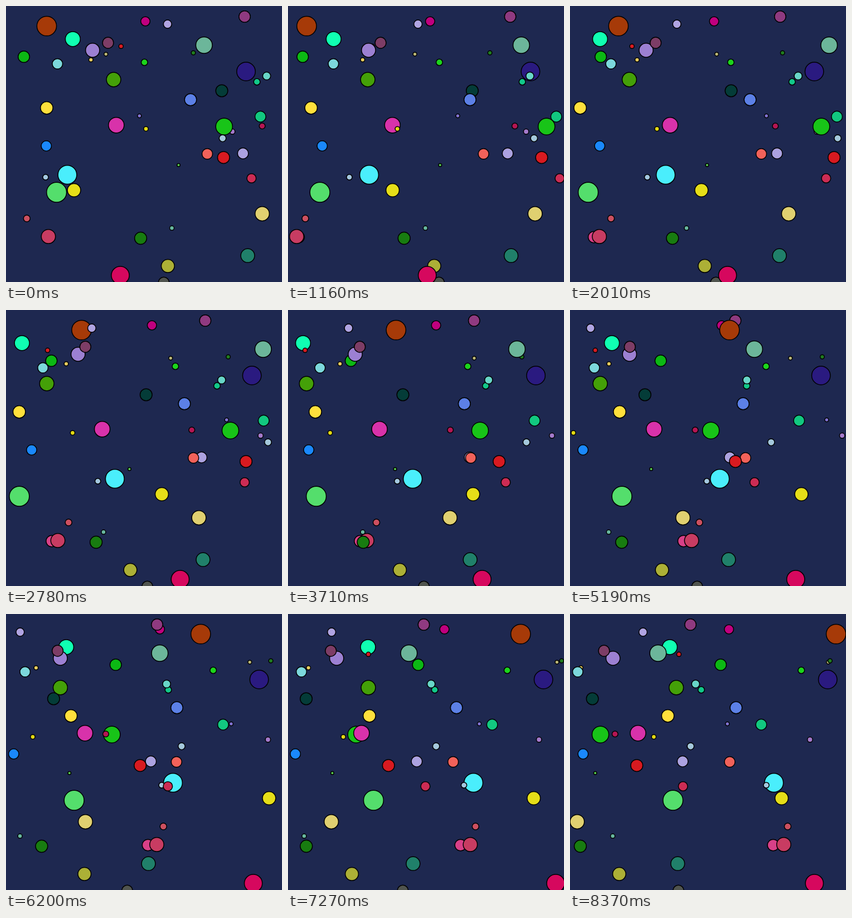
Write an HTML page that moves like this. It is 495 px wide and 495 px high and loops after 8.45 s.

```html
<!DOCTYPE html>
<html lang="en">
<head>
<meta charset="utf-8">
<title>Bouncing balls</title>
<style>
  html, body { margin: 0; width: 100%; height: 100%; overflow: hidden; background: #1e2850; }
  svg { display: block; width: 495px; height: 495px; }
  circle { stroke: #000; stroke-width: 1.5px; }
</style>
</head>
<body>
<svg viewBox="0 0 495 495">
  <!-- data-v: horizontal pixels per step -->
  <circle cx="250" cy="27.5" r="8.3" fill="#c0007f" data-v=".325"/>
  <circle cx="428" cy="19" r="10.2" fill="#8f3a80" data-v="-1.963"/>
  <circle cx="73" cy="36" r="17.6" fill="#a63a08" data-v="-4.858"/>
  <circle cx="289.7" cy="32.5" r="7.4" fill="#b0a4e2" data-v="-3.773"/>

  <circle cx="119.8" cy="59.3" r="13.4" fill="#10ffb2" data-v="-2.533"/>
  <circle cx="206.3" cy="72.3" r="4" fill="#d81c22" data-v="-3.66"/>
  <circle cx="32" cy="91" r="10.3" fill="#0cb814" data-v="-2.622"/>
  <circle cx="155.3" cy="79.3" r="12.6" fill="#9c80d2" data-v="-.724"/>
  <circle cx="183" cy="66" r="9.9" fill="#7d3d66" data-v="-1.13"/>

  <circle cx="152.3" cy="96.5" r="3.8" fill="#e6cc60" data-v="-1.23"/>
  <circle cx="92.3" cy="103.7" r="9.3" fill="#7cd8dc" data-v="-.726"/>
  <circle cx="179.2" cy="86.3" r="3.4" fill="#bcb878" data-v="3.225"/>
  <circle cx="336" cy="84" r="3.8" fill="#207c20" data-v="1.737"/>
  <circle cx="355.2" cy="70.3" r="14.8" fill="#6cb69a" data-v="4.212"/>
  <circle cx="248.3" cy="101" r="5.8" fill="#1cd41c" data-v="1.542"/>

  <circle cx="430.5" cy="117.5" r="16.7" fill="#2a1a80" data-v=".294"/>
  <circle cx="450" cy="136" r="5.8" fill="#12c88a" data-v="-1.987"/>
  <circle cx="467.5" cy="125.5" r="7.1" fill="#68d6c8" data-v="-2.243"/>

  <circle cx="193" cy="132" r="12.9" fill="#44a008" data-v="-3.328"/>
  <circle cx="387" cy="152" r="10.8" fill="#043c38" data-v="-3.77"/>
  <circle cx="331" cy="168" r="10.8" fill="#5c80e6" data-v="-.307"/>

  <circle cx="239.3" cy="197" r="3.5" fill="#8274d4" data-v="4.343"/>
  <circle cx="456.3" cy="198.4" r="9.8" fill="#12c880" data-v="1.655"/>
  <circle cx="406" cy="225.3" r="4.7" fill="#a47acc" data-v="1.405"/>
  <circle cx="391.2" cy="216.2" r="15" fill="#18c418" data-v="4.832"/>
  <circle cx="388.5" cy="237.2" r="6.2" fill="#a4c8dc" data-v="3.522"/>
  <circle cx="459.5" cy="215.3" r="5.3" fill="#b41654" data-v="-3.507"/>

  <circle cx="197.8" cy="213.7" r="14" fill="#d832aa" data-v="-.702"/>
  <circle cx="251" cy="220.3" r="4.1" fill="#e4da14" data-v="-3.655"/>
  <circle cx="425" cy="264.4" r="9.8" fill="#aca2e0" data-v="-2.065"/>
  <circle cx="361" cy="265.3" r="9.5" fill="#f2625a" data-v="-.69"/>
  <circle cx="390.2" cy="271.7" r="10.8" fill="#d81a20" data-v="4.315"/>

  <circle cx="72.3" cy="251" r="9.2" fill="#1a88fc" data-v="-.731"/>
  <circle cx="73" cy="182.7" r="11.2" fill="#ffe03c" data-v="-2.108"/>
  <circle cx="309.5" cy="285.3" r="2.8" fill="#58cc50" data-v="-2.447"/>

  <circle cx="110" cy="302.7" r="16.9" fill="#4aeefc" data-v="2.368"/>
  <circle cx="71" cy="307" r="5.1" fill="#a4c8e0" data-v="2.602"/>
  <circle cx="90.7" cy="334.2" r="17.9" fill="#54de6c" data-v="-2.233"/>
  <circle cx="122" cy="330.3" r="11.9" fill="#e6de18" data-v="4.373"/>
  <circle cx="440.3" cy="309" r="8.3" fill="#cc2c54" data-v="3.13"/>

  <circle cx="78" cy="414.5" r="10.3" fill="#d84088" data-v="-3.92"/>
  <circle cx="76" cy="413.4" r="12.7" fill="#c83c62" data-v="-4.033"/>
  <circle cx="297.5" cy="398.3" r="4" fill="#68b8a0" data-v="-3.405"/>
  <circle cx="241.5" cy="416.5" r="10.9" fill="#187c10" data-v="-2.22"/>
  <circle cx="290.3" cy="466.3" r="11.8" fill="#acb036" data-v="-1.87"/>
  <circle cx="283" cy="496" r="9.7" fill="#50544e" data-v="-.82"/>
  <circle cx="205" cy="483" r="16.1" fill="#d6085e" data-v="2.982"/>

  <circle cx="433.5" cy="447.7" r="12.4" fill="#20806a" data-v="-2.225"/>
  <circle cx="459.5" cy="372.6" r="12.8" fill="#e0d070" data-v="4.626"/>
  <circle cx="37.3" cy="381" r="6" fill="#cc5060" data-v="-3.864"/>
</svg>
<script>
  const LOOP = 8450;

  // [step, ms] marks; steps in between are evenly spaced
  const marks = [
    [0, 0], [1, 70], [12, 950], [15, 1160], [23, 1780], [24, 1850], [34, 2630],
    [35, 2710], [36, 2780], [46, 3550], [47, 3630], [57, 4420], [58, 4500],
    [69, 5340], [70, 5420], [80, 6200], [81, 6280], [92, 7120], [93, 7190],
    [103, 7970], [104, 8050], [108, 8370], [109, LOOP]
  ];

  const balls = [...document.querySelectorAll("circle")].map(el => ({
    el,
    x: +el.getAttribute("cx"),
    r: +el.getAttribute("r"),
    v: +el.dataset.v
  }));

  function stepAt(ms) {
    const i = marks.findIndex(m => m[1] > ms);
    const [n0, t0] = marks[i - 1], [n1, t1] = marks[i];
    return Math.floor(n0 + (n1 - n0) * (ms - t0) / (t1 - t0) + 1e-6);
  }

  // Reflect a straight path between two walls
  function bounce(x, lo, hi) {
    const span = hi - lo, period = 2 * span;
    const d = ((x - lo) % period + period) % period;
    return lo + Math.min(d, period - d);
  }

  let shown = -1;
  function draw(step) {
    if (step === shown) return;
    shown = step;
    for (const { el, x, r, v } of balls) {
      el.setAttribute("cx", bounce(x + v * step, r - .8, 498.8 - r).toFixed(2));
    }
  }

  const start = performance.now();
  function tick() {
    draw(stepAt((performance.now() - start) % LOOP));
    requestAnimationFrame(tick);
  }
  tick();
</script>
</body>
</html>
```
